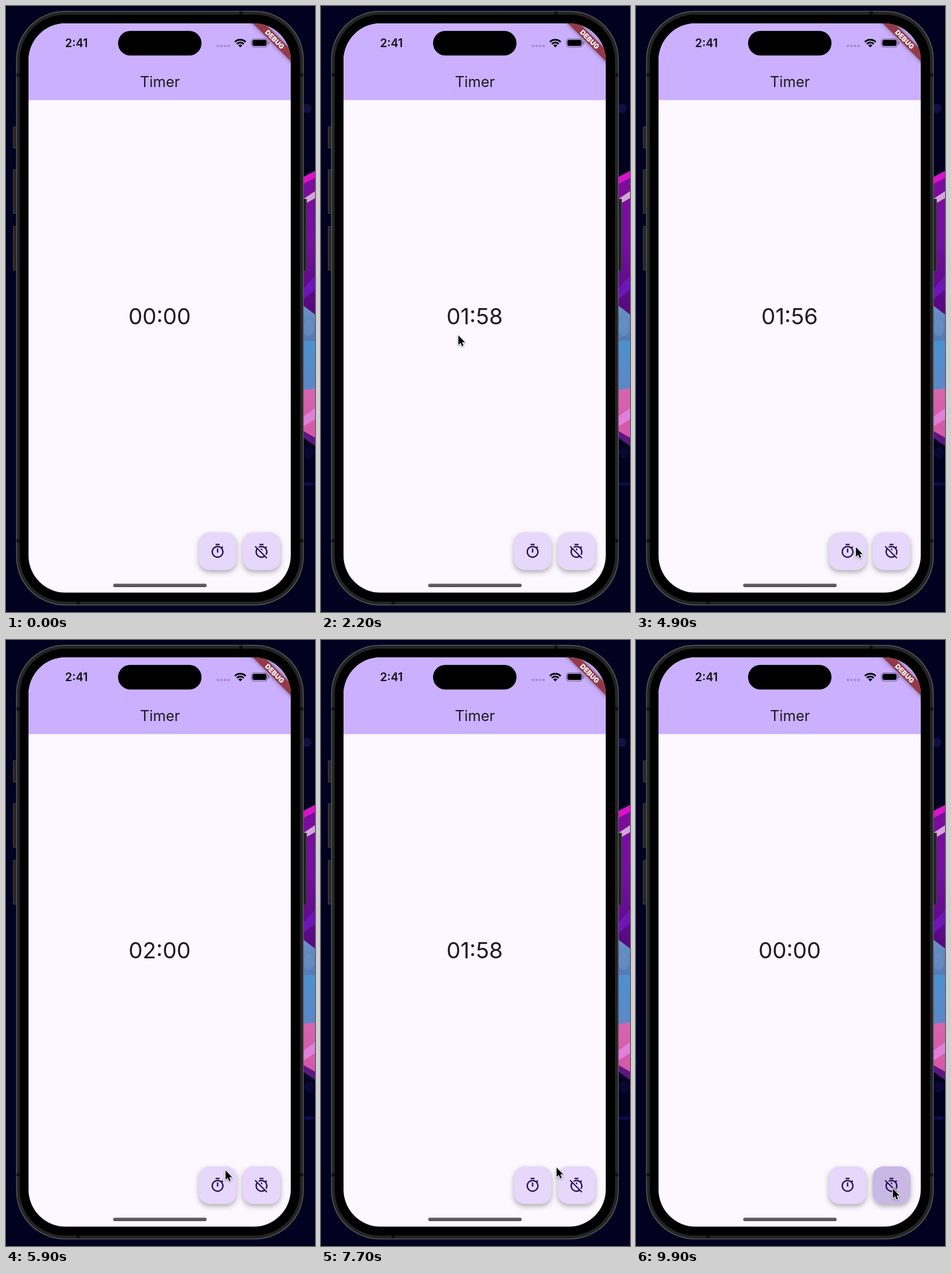
Recreate the animation shown at these times as an HTML page with a canvas. Size 535 by 1047 pixels, loop 10000 ms.

```html
<!DOCTYPE html>
<html lang="en">
<head>
<meta charset="utf-8">
<title>Timer</title>
<style>
  html, body { margin: 0; width: 100%; height: 100%; overflow: hidden; background: #020120; }
  canvas { display: block; }
</style>
</head>
<body>
<canvas id="stage" width="535" height="1047"></canvas>
<script>
const LOOP = 10000;
const ctx = document.getElementById('stage').getContext('2d');
const FONT = 'Inter, "Open Sans", sans-serif';

const TIMER = new Path2D('M15 1H9v2h6V1zm-4 13h2V8h-2v6zm8.03-6.61l1.42-1.42c-.43-.51-.9-.99-1.41-1.41l-1.42 1.42C16.07 4.74 14.12 4 12 4c-4.97 0-9 4.03-9 9s4.02 9 9 9 9-4.03 9-9c0-2.12-.74-4.07-1.97-5.61zM12 20c-3.87 0-7-3.13-7-7s3.13-7 7-7 7 3.13 7 7-3.13 7-7 7z');
const TIMER_OFF = new Path2D('M19.04 4.55l-1.42 1.42C16.07 4.74 14.12 4 12 4c-1.83 0-3.53.55-4.95 1.48l1.46 1.46C9.53 6.35 10.73 6 12 6c3.87 0 7 3.13 7 7 0 1.27-.35 2.47-.94 3.49l1.45 1.45C20.45 16.53 21 14.83 21 13c0-2.12-.74-4.07-1.97-5.61l1.42-1.42-1.41-1.42zM15 1H9v2h6V1zm-4 8.44l2 2V8h-2v1.44zM3.02 4L1.75 5.27 4.5 8.03C3.55 9.45 3 11.16 3 13c0 4.97 4.02 9 9 9 1.84 0 3.55-.55 4.98-1.5l2.5 2.5 1.27-1.27-7.71-7.71L3.02 4zM12 20c-3.87 0-7-3.13-7-7 0-1.28.35-2.48.95-3.52l9.56 9.56c-1.03.61-2.23.96-3.51.96z');
const ARROW = new Path2D('M0 0V16.4L3.8 12.9L6.3 18.7L9 17.6L6.5 11.9H11.6Z');

// Pointer stops: time, x, y
const STOPS = [
  [400, 375, 949], [1500, 237, 568], [2400, 237, 568], [3300, 375, 950],
  [3900, 375, 950], [4700, 380, 934], [5500, 380, 934], [6500, 378, 881],
  [7200, 378, 881], [8300, 445, 949], [9000, 445, 949], [9600, 444, 947]
];

function box(x, y, w, h, r, fill) {
  ctx.beginPath();
  ctx.roundRect(x, y, w, h, r);
  ctx.fillStyle = fill;
  ctx.fill();
}

// Band between the phone edge and the stage edge
function band(leftTop, rightTop, rightEnd, leftEnd, fill) {
  ctx.beginPath();
  ctx.moveTo(514, leftTop);
  ctx.lineTo(535, rightTop);
  ctx.lineTo(535, rightEnd);
  ctx.lineTo(514, leftEnd);
  ctx.fillStyle = fill;
  ctx.fill();
}

function ellipse(x, y, rx, ry, fill) {
  ctx.beginPath();
  ctx.ellipse(x, y, rx, ry, 0, 0, Math.PI * 2);
  ctx.fillStyle = fill;
  ctx.fill();
}

function label(text, x, y, size, weight, fill) {
  ctx.font = `${weight} ${size}px ${FONT}`;
  ctx.textAlign = 'center';
  ctx.textBaseline = 'alphabetic';
  ctx.fillStyle = fill;
  ctx.fillText(text, x, y);
}

function vertical(y0, y1, ...colors) {
  const g = ctx.createLinearGradient(0, y0, 0, y1);
  colors.forEach((c, i) => g.addColorStop(i / (colors.length - 1), c));
  return g;
}

function wallpaper() {
  ctx.fillStyle = '#020120';
  ctx.fillRect(0, 0, 535, 1047);
  ellipse(521, 177, 8, 8, '#111041');
  band(296, 285, 760, 745, vertical(285, 520, '#7d0c9c', '#75109f', '#560a80'));
  band(296, 285, 297, 308, '#d914c8');
  band(334, 320, 332, 344, '#d2a5d9');
  band(489, 466, 490, 507, '#6c16b8');
  band(517, 533, 580, 580, vertical(520, 580, '#6a93c5', '#5379b6'));
  ellipse(524, 556, 9, 14, 'rgba(110,150,205,.45)');
  band(579, 578, 663, 663, vertical(578, 663, '#4c91d0', '#5c87c8'));
  band(663, 661, 746, 734, vertical(661, 746, '#d765ae', '#d557a9'));
  band(710, 695, 714, 727, '#df80d9');
  band(734, 746, 760, 745, '#5e177f');
  ellipse(525, 772, 9, 10, '#090731');
  ellipse(524, 826, 12, 3, '#100a4c');
}

function body() {
  [[208, 38], [282, 77], [380, 77]].forEach(([y, h]) => {
    box(12, y, 8, h, 1.5, '#3d3d3f');
    box(13.5, y + 1, 6, h - 2, 1, '#232325');
  });
  box(513, 333, 8, 125, 1.5, '#39393b');
  box(513, 334, 6, 123, 1, '#1d1d1f');

  box(17.5, 8.5, 498, 1027, 84, '#59595a');
  box(19, 10, 495, 1024, 82.5, '#242425');
  ctx.fillStyle = '#111112';
  ctx.fillRect(404, 9.5, 6, 6);
  ctx.fillRect(122, 1028, 6, 6);
  [116, 921].forEach(y => {
    ctx.fillRect(18.5, y, 6, 6);
    ctx.fillRect(508.5, y, 6, 6);
  });
  box(24, 15, 485, 1014, 78, '#000');
}

function banner() {
  ctx.save();
  ctx.translate(493, 30);
  ctx.rotate(Math.PI / 4);
  ctx.shadowColor = 'rgba(0,0,0,.5)';
  ctx.shadowBlur = 7;
  ctx.fillStyle = '#963848';
  ctx.fillRect(-60, 32.3, 120, 13.9);
  ctx.shadowColor = 'transparent';
  label('DEBUG', 0, 43.5, 11.8, 900, '#fff');
  ctx.restore();
}

function statusBar() {
  label('2:41', 122, 71, 19.7, 600, '#100d14');
  box(194, 43, 144.5, 42.5, 21.25, '#000');
  for (let i = 0; i < 4; i++) box(364.8 + i * 6.2, 67, 4, 4, 1.2, '#a58ad0');

  ctx.save();
  ctx.beginPath();
  ctx.moveTo(405.6, 71.5);
  ctx.lineTo(391.6, 57.5);
  ctx.lineTo(391.6, 50);
  ctx.lineTo(419.6, 50);
  ctx.lineTo(419.6, 57.5);
  ctx.clip();
  ctx.strokeStyle = '#000';
  ctx.lineWidth = 3;
  [12.8, 7.9].forEach(r => {
    ctx.beginPath();
    ctx.arc(405.6, 71, r, Math.PI, 0);
    ctx.stroke();
  });
  ellipse(405.6, 71, 4.6, 4.6, '#000');
  ctx.restore();

  ctx.beginPath();
  ctx.roundRect(424.8, 56.8, 28.2, 14, 4.6);
  ctx.strokeStyle = 'rgba(40,25,60,.5)';
  ctx.lineWidth = 1.2;
  ctx.stroke();
  box(426.6, 58.6, 24.6, 10.4, 3, '#000');
  box(454.2, 61.5, 1.6, 4.8, .8, 'rgba(40,25,60,.5)');
}

function button(x, icon, press) {
  ctx.save();
  ctx.shadowColor = 'rgba(0,0,0,.3)';
  ctx.shadowBlur = 9;
  ctx.shadowOffsetY = 4;
  box(x, 909.5, 65.3, 65, 18.5, '#e6d7fb');
  ctx.restore();
  if (press > 0) box(x, 909.5, 65.3, 65, 18.5, `rgba(33,0,93,${.15 * press})`);
  ctx.save();
  ctx.translate(x + 18.7, 928.1);
  ctx.scale(1.155, 1.155);
  ctx.fillStyle = '#220651';
  ctx.fill(icon);
  ctx.restore();
}

function secondsLeft(t) {
  if (t < 100 || t >= 9700) return 0;
  const start = t < 5200 ? 100 : 5200;
  return 120 - Math.floor((t - start) / 1000);
}

function clock(s) {
  const two = n => String(n).padStart(2, '0');
  return two(Math.floor(s / 60)) + ':' + two(s % 60);
}

// Full while held, then fades out
function pressAt(t, from) {
  if (t < from) return 0;
  return Math.max(0, Math.min(1, 1 - (t - from - 300) / 200));
}

function screen(t) {
  ctx.save();
  ctx.beginPath();
  ctx.roundRect(39, 30, 454, 983.5, 64);
  ctx.clip();
  ctx.fillStyle = '#fdf8ff';
  ctx.fillRect(39, 30, 454, 984);
  ctx.fillStyle = '#cab0fe';
  ctx.fillRect(39, 30, 454, 132.6);
  label('Timer', 266.5, 139.6, 25.4, 400, '#1d1b20');
  label(clock(secondsLeft(t)), 266, 550, 38.5, 400, '#1d1b20');
  button(333.8, TIMER, Math.max(pressAt(t, 100), pressAt(t, 5100)));
  button(409.8, TIMER_OFF, pressAt(t, 9600));
  banner();
  statusBar();
  box(185.5, 998, 162, 6, 3, vertical(998, 1004, '#6f6c71', '#4d4a4f'));
  ctx.restore();
}

function pointerAt(t) {
  const next = STOPS.findIndex(s => s[0] > t);
  if (next === 0) return STOPS[0].slice(1);
  if (next < 0) return STOPS[STOPS.length - 1].slice(1);
  const [t0, x0, y0] = STOPS[next - 1];
  const [t1, x1, y1] = STOPS[next];
  const u = (t - t0) / (t1 - t0);
  const k = u * u * (3 - 2 * u);
  return [x0 + (x1 - x0) * k, y0 + (y1 - y0) * k];
}

function pointer(t) {
  if (t < 100) return;
  const [x, y] = pointerAt(t);
  ctx.save();
  ctx.translate(x + .8, y + 1);
  ctx.lineJoin = 'round';
  ctx.lineWidth = 2.4;
  ctx.strokeStyle = '#fff';
  ctx.shadowColor = 'rgba(0,0,0,.4)';
  ctx.shadowBlur = 3;
  ctx.shadowOffsetY = 1;
  ctx.stroke(ARROW);
  ctx.shadowColor = 'transparent';
  ctx.fillStyle = '#000';
  ctx.fill(ARROW);
  ctx.restore();
}

const began = performance.now();

function draw() {
  const t = (performance.now() - began) % LOOP;
  wallpaper();
  body();
  screen(t);
  pointer(t);
  requestAnimationFrame(draw);
}

draw();
</script>
</body>
</html>
```
